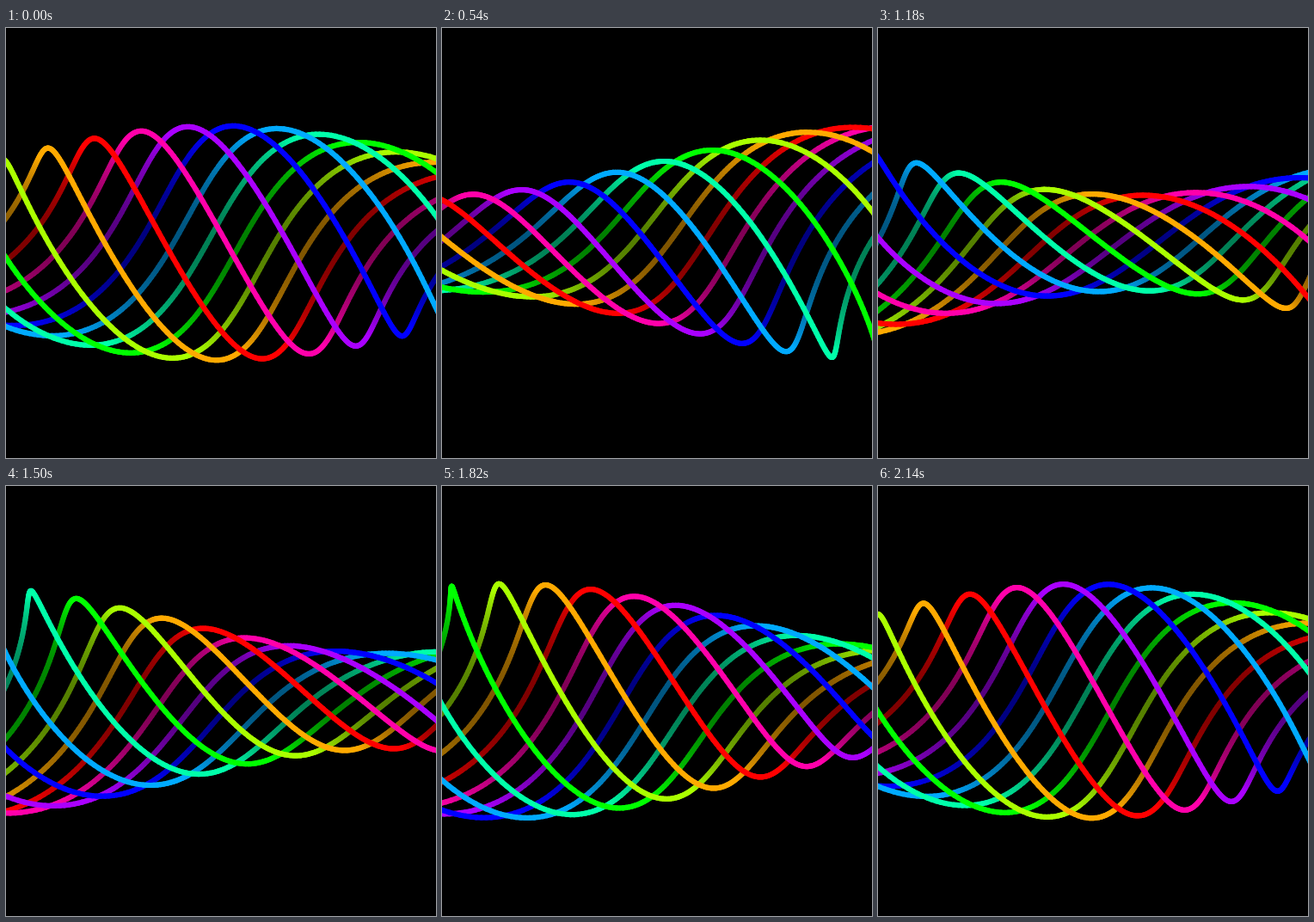
Recreate the animation shown at these times as an HTML page with a canvas. Size 500 by 500 pixels, loop 2.16 s.

```html
<!DOCTYPE html>
<html>
<head>
<meta charset="utf-8">
<style>
html, body { margin: 0; width: 100%; height: 100%; overflow: hidden; background: #000; }
canvas { display: block; width: 500px; height: 500px; }
</style>
</head>
<body>
<canvas id="stage" width="500" height="500"></canvas>
<script>
const ctx = document.getElementById('stage').getContext('2d');
const TAU = Math.PI * 2;
const LOOP = 2160, TICK = 20;
const EYE = 433;        // viewing distance
const TURN = 455;       // length of one full twist
const SWELL = 1000;     // wavelength of the radius
const OFFSET = 8.2;     // where the blue strand starts its twist
const STRANDS = 9, BLUE = 6;
const STEP = 3, REACH = 345;

function point(s, i, u) {
  const angle = TAU * ((s + OFFSET) / TURN + u + (i - BLUE) / STRANDS);
  const r = 92.5 + 37.5 * Math.cos(TAU * (s / SWELL - u));
  const depth = Math.sin(angle);
  const scale = EYE / (EYE - r * depth);
  return {
    x: 250 + s * scale,
    y: 250 - r * Math.cos(angle) * scale,
    z: r * depth,
    depth
  };
}

function draw(u) {
  const parts = [];
  for (let i = 0; i < STRANDS; i++) {
    const hue = i * 360 / STRANDS;
    let a = point(-REACH, i, u);
    for (let s = -REACH + STEP; s <= REACH; s += STEP) {
      const b = point(s, i, u);
      if (Math.max(a.x, b.x) > -8 && Math.min(a.x, b.x) < 508) {
        parts.push({ a, b, hue, z: a.z + b.z });
      }
      a = b;
    }
  }
  parts.sort((p, q) => p.z - q.z);

  ctx.fillStyle = '#000';
  ctx.fillRect(0, 0, 500, 500);
  ctx.lineWidth = 6.2;
  ctx.lineCap = 'round';
  for (const { a, b, hue } of parts) {
    // the far half of each turn fades to half brightness
    const light = 50 + 25 * Math.min(0, (a.depth + b.depth) / 2);
    ctx.strokeStyle = `hsl(${hue}, 100%, ${light}%)`;
    ctx.beginPath();
    ctx.moveTo(a.x, a.y);
    ctx.lineTo(b.x, b.y);
    ctx.stroke();
  }
}

const start = performance.now();
function frame() {
  const t = Math.max(0, performance.now() - start) % LOOP;
  draw(Math.floor(t / TICK) * TICK / LOOP);
  requestAnimationFrame(frame);
}
draw(0);
requestAnimationFrame(frame);
</script>
</body>
</html>
```
